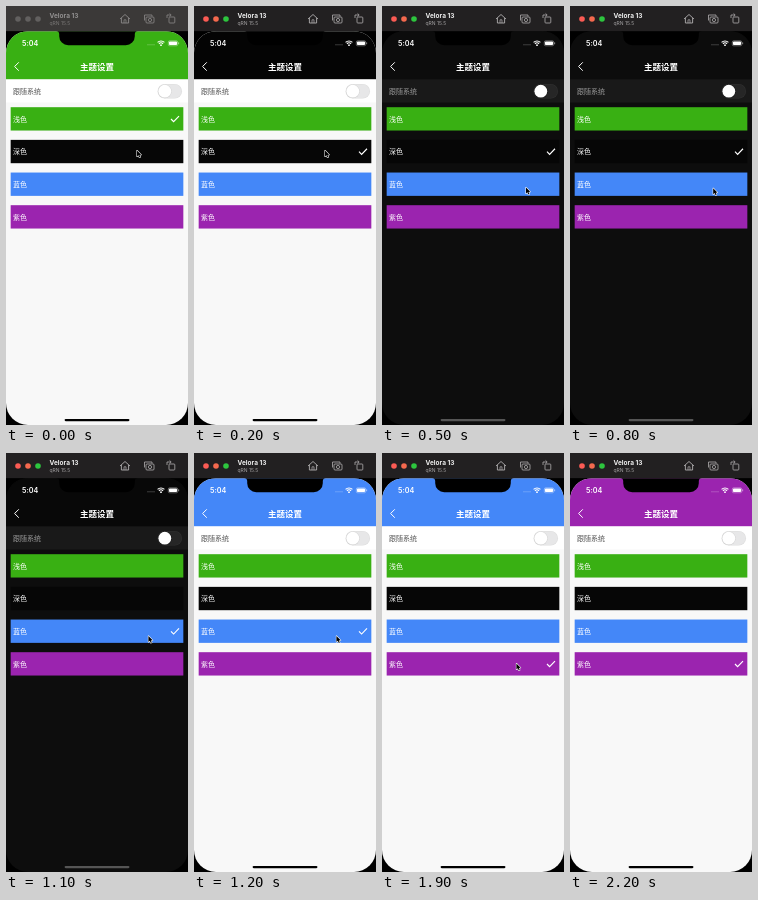
Animation, 182 px wide and 419 px high, one loop 2.3 s. Source, as an HTML page with a canvas:

```html
<!DOCTYPE html>
<html lang="zh-CN">
<head>
<meta charset="utf-8">
<title>主题设置</title>
<style>
html, body { margin: 0; width: 100%; height: 100%; overflow: hidden; background: #000; }
canvas { display: block; width: 182px; height: 419px; }
</style>
</head>
<body>
<canvas id="stage"></canvas>
<script>
const W = 182, H = 419, LOOP = 2300, STEP = 100;
const PT = W / 390;            // phone points to stage pixels
const TOP = H - 844 * PT;      // top edge of the phone screen
const CJK = '"Noto Sans CJK SC", "Noto Sans CJK", sans-serif';
const LATIN = 'Inter, "Liberation Sans", sans-serif';
const canvas = document.getElementById('stage');
const ctx = canvas.getContext('2d');
const ratio = window.devicePixelRatio || 1;
canvas.width = W * ratio;
canvas.height = H * ratio;

const rows = [
  { name: '浅色', color: '#39b013' },
  { name: '深色', color: '#060606' },
  { name: '蓝色', color: '#4487f8' },
  { name: '紫色', color: '#9b24af' }
];

// Theme keyframes: start time, header colour, dark page, checked row
const themes = [
  { t: 0, head: rows[0].color, dark: false, pick: 0 },
  { t: 200, head: '#040404', dark: false, pick: 1 },
  { t: 500, head: '#0c0c0c', dark: true, pick: 1 },
  { t: 1100, head: '#080808', dark: true, pick: 2 },
  { t: 1200, head: rows[2].color, dark: false, pick: 2 },
  { t: 1900, head: rows[2].color, dark: false, pick: 3 },
  { t: 2000, head: rows[3].color, dark: false, pick: 3 }
];

// Pointer path: time, x, y
const path = [
  [0, 131, 144.5], [200, 131, 144.5], [400, 144, 181.5], [700, 144, 181.5],
  [900, 142.4, 183], [1300, 142.4, 183], [1600, 134.4, 210.5], [2000, 134.4, 210.5]
];

function rect(x, y, w, h, color) {
  ctx.fillStyle = color;
  ctx.fillRect(x, y, w, h);
}

function round(x, y, w, h, r, color) {
  ctx.beginPath();
  ctx.roundRect(x, y, w, h, r);
  ctx.fillStyle = color;
  ctx.fill();
}

function disc(x, y, r, color) {
  ctx.beginPath();
  ctx.arc(x, y, r, 0, Math.PI * 2);
  ctx.fillStyle = color;
  ctx.fill();
}

function line(points, color, width) {
  ctx.beginPath();
  points.forEach(([x, y]) => ctx.lineTo(x, y));
  ctx.strokeStyle = color;
  ctx.lineWidth = width;
  ctx.stroke();
}

function label(text, x, y, font, color, align = 'left') {
  ctx.font = font;
  ctx.fillStyle = color;
  ctx.textAlign = align;
  ctx.textBaseline = 'alphabetic';
  ctx.fillText(text, x, y);
}

function box(x, y, w, h, r, color, width) {
  ctx.beginPath();
  ctx.roundRect(x, y, w, h, r);
  ctx.strokeStyle = color;
  ctx.lineWidth = width;
  ctx.stroke();
}

function titleBar(active) {
  rect(0, 0, W, TOP, active ? '#222021' : '#3b3938');
  const lights = active ? ['#fb5b54', '#f4694e', '#2dc53e'] : ['#62605f', '#62605f', '#62605f'];
  lights.forEach((c, i) => disc(12 + i * 10, 13, 2.8, c));
  label('Velora 13', 43.5, 11.5, '700 6.5px ' + LATIN, active ? '#f0f0f0' : '#929090');
  label('qRN 15.5', 43.5, 18.5, '400 5px ' + LATIN, active ? '#a5a3a4' : '#7a7877');

  const ink = active ? '#b0aeaf' : '#8c8a89';
  line([[114, 13], [119, 8.5], [124, 13]], ink, 0.9);
  line([[115.4, 12], [115.4, 17], [122.6, 17], [122.6, 12]], ink, 0.9);
  line([[118, 17], [118, 13.8], [120, 13.8], [120, 17]], ink, 0.7);

  line([[138.5, 14.5], [138.5, 9], [146, 9], [146, 10.5]], ink, 0.8);
  box(140, 11, 8, 6, 1, ink, 0.8);
  ctx.beginPath();
  ctx.arc(144, 14, 1.6, 0, Math.PI * 2);
  ctx.stroke();

  box(163, 11, 5.8, 6, 0.8, ink, 0.8);
  line([[161, 12], [161, 9], [165, 9]], ink, 0.8);
  line([[163.5, 7.4], [165.2, 9], [163.5, 10.6]], ink, 0.7);
}

function statusBar() {
  label('5:04', 16, 39.8, '600 7.2px ' + LATIN, '#fff');
  for (let i = 0; i < 4; i++) disc(142 + i * 2, 38.7, 0.5, 'rgba(255,255,255,.55)');
  ctx.strokeStyle = '#fff';
  ctx.lineWidth = 1.1;
  for (const r of [4.8, 2.9]) {
    ctx.beginPath();
    ctx.arc(155, 39.8, r, -Math.PI * 0.75, -Math.PI * 0.25);
    ctx.stroke();
  }
  disc(155, 39.2, 0.9, '#fff');
  box(162.3, 34.8, 9.4, 5, 1.4, 'rgba(255,255,255,.6)', 0.6);
  round(163, 35.5, 8, 3.6, 0.8, '#fff');
  rect(172.4, 36.4, 0.7, 1.8, 'rgba(255,255,255,.7)');
}

function notch() {
  const half = 81 * PT, mid = W / 2, low = TOP + 30 * PT;
  const l = mid - half, r = mid + half;
  ctx.beginPath();
  ctx.moveTo(l - 3, TOP);
  ctx.quadraticCurveTo(l, TOP, l, TOP + 3);
  ctx.arcTo(l, low, mid, low, 9);
  ctx.arcTo(r, low, r, TOP, 9);
  ctx.lineTo(r, TOP + 3);
  ctx.quadraticCurveTo(r, TOP, r + 3, TOP);
  ctx.closePath();
  ctx.fillStyle = '#000';
  ctx.fill();
}

function toggle(dark) {
  round(151.5, 78, 24.5, 14.5, 7.25, dark ? '#303030' : '#dedede');
  round(152.1, 78.6, 23.3, 13.3, 6.65, dark ? '#262626' : '#e7e7e8');
  disc(158.8, 85.4, 6.8, dark ? '#111' : '#cfcfcf');
  disc(158.8, 85.2, 6.4, '#fff');
}

function phone({ head, dark, pick }) {
  const bar = TOP + 103 * PT;
  rect(0, TOP, W, H - TOP, '#000');
  ctx.save();
  ctx.beginPath();
  ctx.roundRect(0, TOP, W, H - TOP, 47 * PT);
  ctx.clip();
  rect(0, TOP, W, H - TOP, dark ? '#0d0d0d' : '#f8f8f8');
  rect(0, bar, W, 50 * PT, dark ? '#191919' : '#fff');
  rect(0, TOP, W, bar - TOP, head);
  statusBar();
  line([[12.8, 56.3], [8.6, 60.5], [12.8, 64.7]], '#fff', 1);
  label('主题设置', 91, 63.7, '700 8.5px ' + CJK, '#fff', 'center');
  label('跟随系统', 7, 88, '400 7px ' + CJK, dark ? '#999' : '#555');
  toggle(dark);
  rows.forEach((row, i) => {
    const y = bar + (60 + 70 * i) * PT;
    rect(10 * PT, y, 370 * PT, 50 * PT, row.color);
    label(row.name, 7, y + 14.4, '500 7px ' + CJK, '#fff');
    if (i === pick) {
      const m = y + 11.8;
      line([[165, m], [167.6, m + 2.7], [173, m - 2.9]], '#fff', 1.15);
    }
  });
  round(58.6, 412.9, 139 * PT, 5 * PT, 1.17, dark ? '#555' : '#000');
  ctx.restore();
  notch();
}

function pointer(t) {
  if (t > 2000) return;
  let i = 0;
  while (i < path.length - 2 && t >= path[i + 1][0]) i++;
  const [t0, x0, y0] = path[i], [t1, x1, y1] = path[i + 1];
  const u = Math.min(1, (t - t0) / (t1 - t0));
  const k = u * u * (3 - 2 * u);
  ctx.save();
  ctx.translate(x0 + (x1 - x0) * k, y0 + (y1 - y0) * k);
  ctx.scale(0.82, 0.82);
  ctx.beginPath();
  [[0, 0], [0, 7.4], [1.7, 5.9], [2.9, 8.6], [4.2, 8], [3, 5.4], [5.2, 5.2]]
    .forEach(([x, y]) => ctx.lineTo(x, y));
  ctx.closePath();
  ctx.lineJoin = 'round';
  ctx.strokeStyle = '#fff';
  ctx.lineWidth = 1.3;
  ctx.stroke();
  ctx.fillStyle = '#000';
  ctx.fill();
  ctx.restore();
}

function draw(t) {
  ctx.setTransform(ratio, 0, 0, ratio, 0, 0);
  phone(themes.filter(s => s.t <= t).pop());
  titleBar(t >= 100);
  pointer(t);
}

const start = performance.now();
function tick() {
  const t = (performance.now() - start) % LOOP;
  draw(Math.floor(t / STEP) * STEP);
  requestAnimationFrame(tick);
}
tick();
</script>
</body>
</html>
```
